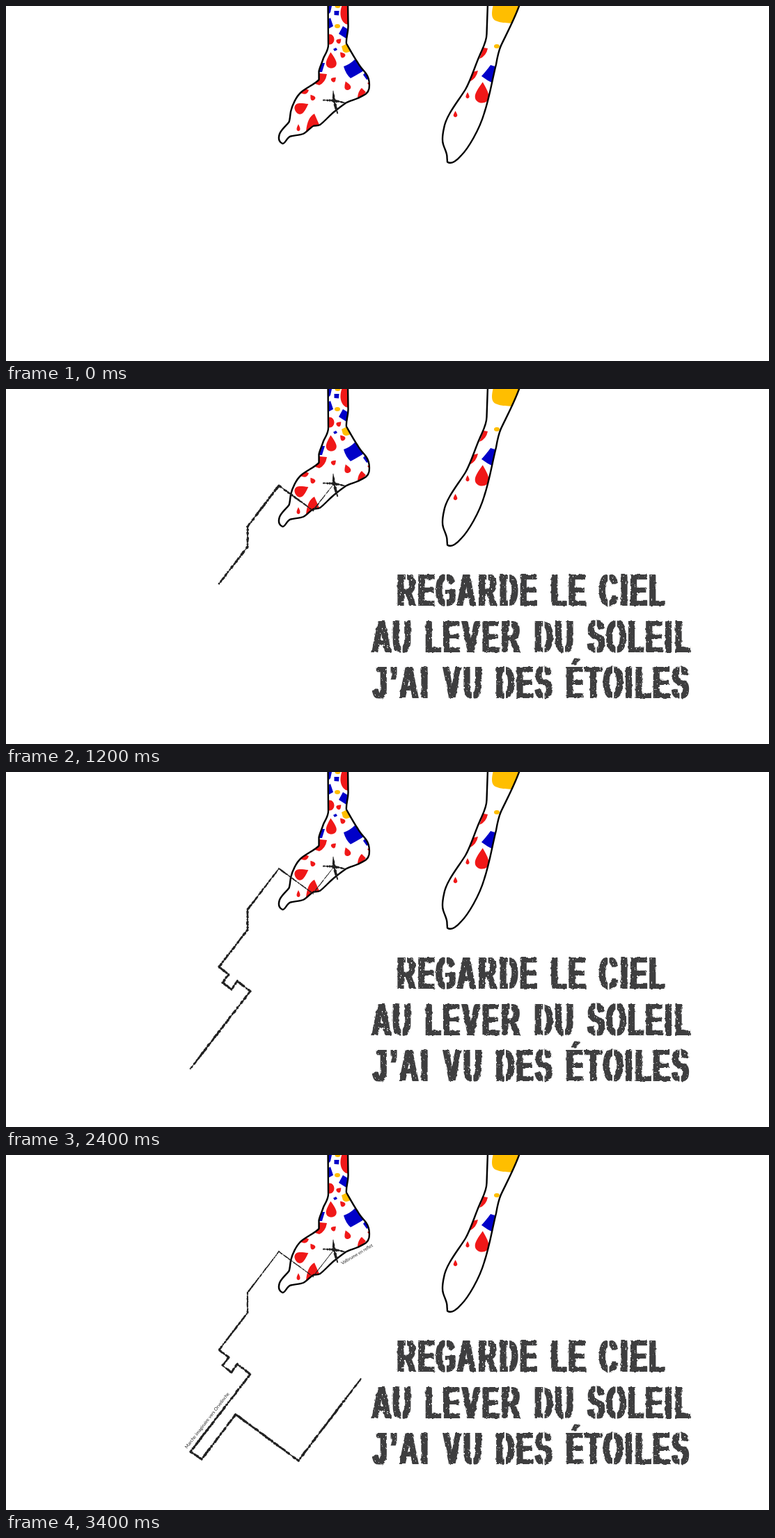
An HTML page for the animation above (3.6 s loop, 1096 px wide and 511 px high).

```html
<!DOCTYPE html>
<html lang="fr">
<head>
<meta charset="utf-8">
<title>Regarde le ciel</title>
<style>
  html, body { margin: 0; width: 100%; height: 100%; overflow: hidden; background: #fff; }
  svg { display: block; width: 100%; height: 100%; }
  .outline { fill: none; stroke: #000; stroke-width: 2.4; stroke-linejoin: round; }
  .red { fill: #f01818; }
  .blue { fill: #0000c8; }
  .yellow { fill: #ffbe00; }
  .ink { fill: #222; }
  #poem text {
    font: bold 64.5px "Liberation Sans", Arial, sans-serif;
    fill: #3e3e3f; text-anchor: middle; white-space: pre;
  }
  #slits { stroke: #fff; stroke-width: 2.2; fill: none; }
  #labels text { font-family: Lato, "Open Sans", sans-serif; fill: #222; }
</style>
</head>
<body>
<svg viewBox="0 0 1096 511">
  <defs>
    <filter id="grunge" filterUnits="userSpaceOnUse" x="510" y="250" width="490" height="210"
            color-interpolation-filters="sRGB">
      <feMorphology operator="dilate" radius="2.3 0" result="bold"/>
      <feTurbulence type="fractalNoise" baseFrequency=".16" numOctaves="2" seed="4" result="wobble"/>
      <feDisplacementMap in="bold" in2="wobble" scale="3.5" xChannelSelector="R" yChannelSelector="G" result="rough"/>
      <feTurbulence type="fractalNoise" baseFrequency=".38" numOctaves="2" seed="9"/>
      <feColorMatrix values="0 0 0 0 0  0 0 0 0 0  0 0 0 0 0  0 0 0 10 -7" result="specks"/>
      <feComposite in="rough" in2="specks" operator="out"/>
    </filter>
    <clipPath id="leftClip"><use href="#leftLeg"/></clipPath>
    <clipPath id="rightClip"><use href="#rightLeg"/></clipPath>
    <path id="leftLeg" d="M462.5-4L463 56C463 64 458 70 456 75C453 84 450 90 449.5 94L449.5 106C446 111 431 118 424 124
      C417 130 411 143 409 152C408 158 408 163 406.5 167C403 172 396 177 393 184C391 190 391 195 397 198
      C401 199 403 189 409 187.5C415 186 422 186 427 184C433 181 438 174 442 172.5C445 172 448 172.5 451 171
      C458 166 466 156 473 151C478 147 483 143 489 139C495 136 504 134 509 131C515 128 520 126 521.5 119
      C522.5 112 522 104 517 97C513 92 508 87 505 81C500 74 493 61 489 54C488 46 492 38 491.5 28L491-4"/>
    <path id="rightLeg" d="M692-4L690.5 40C690.5 52 684 62 680 72C673 88 668 106 660 120C651 135 632 157 629 176
      C626 190 627 196 628 199C630 206 634 212 633.5 218L634 224.5C640 229 649 221 654 215
      C664 205 680 178 687 154C695 130 698 108 704 84C706 72 708 64 711 57C718 42 731 18 738.5-4"/>
  </defs>

  <g clip-path="url(#leftClip)">
    <g id="leftDrops" class="red"></g>
    <path class="red" d="M483-2C479 8 479 20 488 26L493 27V-2ZM450 97L461 98Q459 110 450 114L444 112Z
      M505 131Q506 122 511 118L517 124L508 134ZM519 111L524 108V117ZM423 125Q432 130 435 121L425 117Z
      M431 180Q433 160 443 155L450 171L433 183Z"/>
    <ellipse class="red" cx="465" cy="48" rx="6.5" ry="7.5"/>
    <path class="blue" d="M461-2L468 0L466 9L461 14ZM471.5 7L478.5 7L478 13.5L471.5 13ZM461 20L466 17L470 29L461 34Z
      M484 29L492 34L489 47L478 40ZM470 62L474 60L476 63L472 65Z
      M485 87Q494 84 502 76L514 93Q506 98 495 104Q488 98 485 87ZM513 99L517 94L524 104L518 106Z
      M450 86L453 82L458 82L454 95L448 95Z"/>
    <path class="yellow" d="M482 58L490 54L496 64Q489 70 484 65Z"/>
    <ellipse class="yellow" cx="476.500" cy="0" rx="4" ry="3"/>
    <ellipse class="yellow" cx="476" cy="29" rx="4" ry="3"/>
  </g>
  <g clip-path="url(#rightClip)">
    <g id="rightDrops" class="red"></g>
    <path class="yellow" d="M700-2C697 10 697 18 703 21C712 25 720 24 727 25L742-2Z"/>
    <ellipse class="yellow" cx="705" cy="58" rx="4" ry="3"/>
    <path class="red" d="M692 61Q690 72 680 76L686 60ZM670 95L678 93Q676 104 666 109Z"/>
    <path class="blue" d="M683 101Q691 92 696 85L706 88L701 112Q692 108 683 101Z"/>
  </g>
  <use href="#leftLeg" class="outline"/>
  <use href="#rightLeg" class="outline"/>

  <path id="cross" class="ink"/>
  <path id="trail" class="ink"/>
  <g id="verse">
    <g filter="url(#grunge)"><g id="poem" transform="scale(.56 1)"></g></g>
    <path id="slits"/>
  </g>
  <g id="labels">
    <text transform="translate(483 158) rotate(-31)" font-size="6.4">Valbrume en reflet</text>
    <text transform="translate(260 423) rotate(-52.300)" font-size="6.6">Marche imaginaire vers Orvelinche</text>
  </g>
</svg>
<script>
  const LOOP = 3600, STEP = 200, SQUEEZE = 0.56;
  const $ = id => document.getElementById(id);

  function add(parent, tag, attrs, content = '') {
    const el = document.createElementNS('http://www.w3.org/2000/svg', tag);
    for (const key in attrs) el.setAttribute(key, attrs[key]);
    el.textContent = content;
    parent.append(el);
  }

  function random(seed) {
    return () => {
      seed = (seed + 0x6D2B79F5) | 0;
      let v = Math.imul(seed ^ (seed >>> 15), 1 | seed);
      v ^= v + Math.imul(v ^ (v >>> 7), 61 | v);
      return ((v ^ (v >>> 14)) >>> 0) / 4294967296;
    };
  }

  // Teardrops: centre, width, height, rotation.
  function drop(parent, [x, y, w, h, turn = 0]) {
    const a = w / 2, b = w * 0.3, top = -h / 2, low = h * 0.2, mid = h * 0.05;
    add(parent, 'path', {
      d: `M0 ${top}C${b} ${-low} ${a} ${mid} ${a} ${low}C${a} ${h * 0.6} ${-a} ${h * 0.6} ${-a} ${low}` +
         `C${-a} ${mid} ${-b} ${-low} 0 ${top}Z`,
      transform: `translate(${x} ${y}) rotate(${turn})`
    });
  }
  [[467, 78, 15, 23, -3], [478.5, 50, 7, 8, 45], [483, 70, 7, 9, -40], [471, 105.500, 7, 8, 45],
   [490, 114.500, 9, 13, -20], [440, 131.500, 7, 9, -35], [425, 146, 16, 21, 62], [420, 175, 5, 10]]
    .forEach(spec => drop($('leftDrops'), spec));
  [[684, 124.500, 20, 30, 3], [663, 128.500, 5, 9], [645.5, 155.500, 5.5, 9]]
    .forEach(spec => drop($('rightDrops'), spec));

  // Stencil lettering: glyph advances in pixels.
  const ADVANCE = { R: 31, E: 26.5, 'É': 26.5, G: 29.5, A: 29.5, D: 30, L: 26, C: 30, I: 15, U: 29,
                    V: 30, S: 28, O: 30, J: 25.5, '’': 14, T: 27, ' ': 17.2 };
  let slits = '';
  function writeLine(line, left, base) {
    let x = left;
    const centres = [...line].map(ch => {
      const mid = x + ADVANCE[ch] / 2;
      x += ADVANCE[ch];
      if ('RDGCOSU'.includes(ch)) slits += `M${mid} ${base - 46}v13M${mid} ${base - 13}v15`;
      return (mid / SQUEEZE).toFixed(2);
    });
    add($('poem'), 'text', { x: centres.join(' '), y: base }, line);
  }
  writeLine('REGARDE LE CIEL', 559.5, 312.5);
  writeLine('AU LEVER DU SOLEIL', 524.5, 379);
  writeLine('J’AI VU DES ÉTOILES', 524.5, 445.5);
  $('slits').setAttribute('d', slits);

  // Charcoal brush whose texture stretches over the whole polyline.
  function brush(points, seed, widthAt) {
    const rnd = random(seed);
    const spans = points.slice(1).map((p, i) => Math.hypot(p[0] - points[i][0], p[1] - points[i][1]));
    const total = spans.reduce((a, b) => a + b, 0);
    let done = 0, d = '';
    spans.forEach((len, i) => {
      const [x, y] = points[i];
      const ux = (points[i + 1][0] - x) / len, uy = (points[i + 1][1] - y) / len;
      const left = [], right = [], count = Math.ceil((len + 2) / 1.6);
      for (let k = 0; k <= count; k++) {
        const s = -1 + (len + 2) * k / count;
        const f = Math.min(1, Math.max(0, (done + s) / total));
        const half = widthAt(f) / 2;
        const spot = (off, list) =>
          list.push(`${(x + ux * s - uy * off).toFixed(1)} ${(y + uy * s + ux * off).toFixed(1)}`);
        const thin = rnd() < 0.15 ? 0.4 : 1;
        spot(half * thin * (0.65 + 0.6 * rnd()), left);
        spot(-half * thin * (0.65 + 0.6 * rnd()), right);
      }
      d += 'M' + left.concat(right.reverse()).join('L') + 'Z';
      done += len;
    });
    return d;
  }

  const swell = f => 1.8 + 2.4 * Math.sin(Math.PI * f);
  $('cross').setAttribute('d',
    brush([[470, 123], [471, 136], [476, 154]], 3, swell) +
    brush([[456, 135.5], [470, 136], [486, 139]], 8, swell));

  const ROUTE = [[469, 139], [441, 175], [392, 139], [347, 198], [347, 227], [306, 280.5], [320, 291.5], [311, 303],
                 [324, 313], [332, 301], [351, 315.5], [265, 427], [281, 438], [330, 373.5], [420, 440], [509.5, 322.5]];
  const taper = f => (0.9 + 2.5 * Math.min(1, f / 0.4)) * (f > 0.96 ? 0.8 : 1);

  let shown = -1;
  function draw() {
    const step = Math.floor(performance.now() % LOOP / STEP);
    if (step !== shown) {
      shown = step;
      $('verse').style.visibility = step > 0 ? 'visible' : 'hidden';
      $('labels').style.visibility = step > 16 ? 'visible' : 'hidden';
      $('trail').setAttribute('d', step > 1 ? brush(ROUTE.slice(0, step), 20 + step, taper) : '');
    }
    requestAnimationFrame(draw);
  }
  draw();
</script>
</body>
</html>
```
